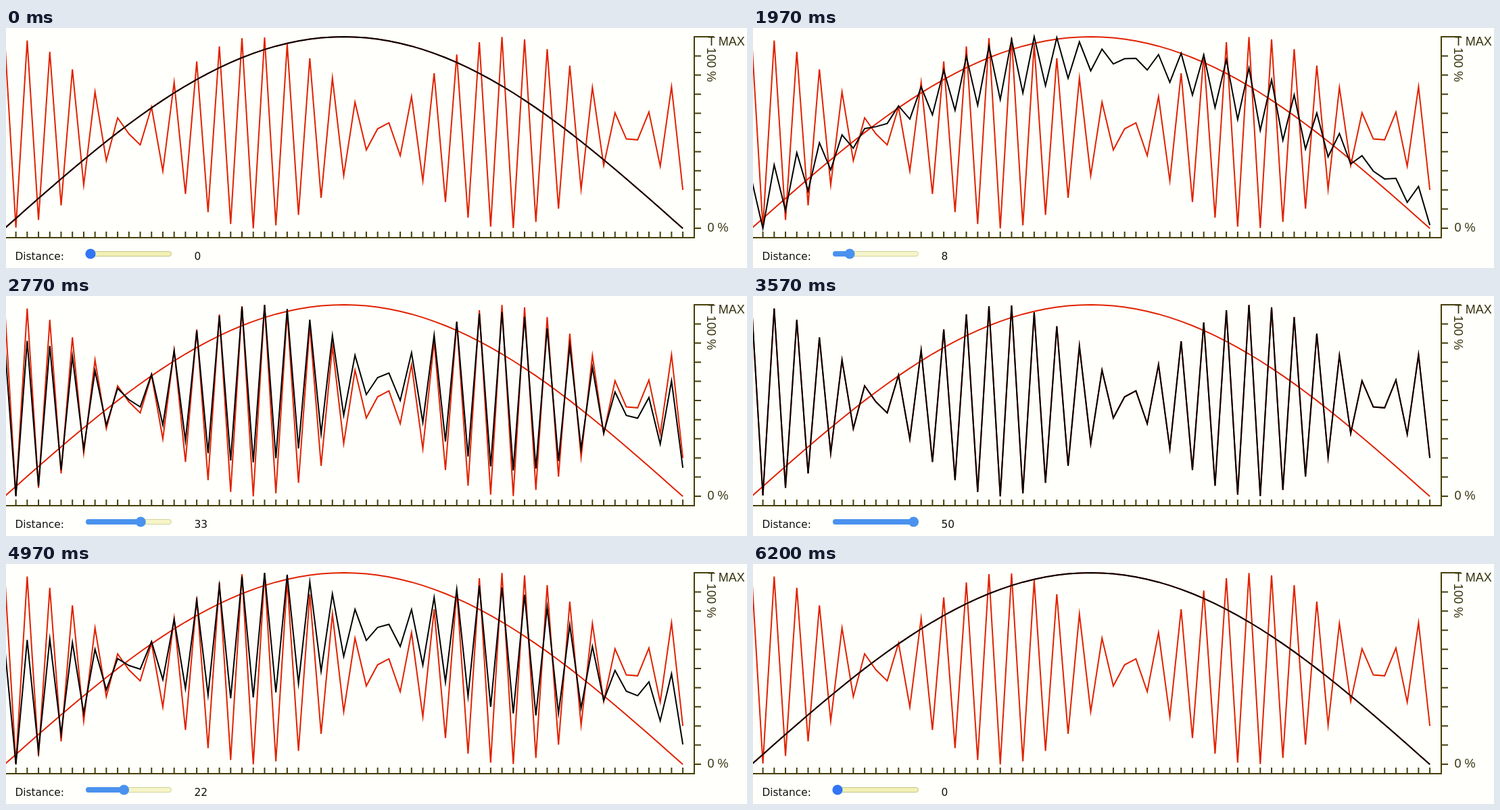
Recreate the animation shown at these times as an HTML page. Size 1096 by 356 pixels, loop 7.87 s.

```html
<!DOCTYPE html>
<html lang="en">
<head>
<meta charset="utf-8">
<title>Wave blend</title>
<style>
  html, body { margin: 0; width: 100%; height: 100%; overflow: hidden; background: #fffffb; }
  svg { display: block; width: 1096px; height: 356px; }
  .axis { fill: none; stroke: #453f08; stroke-width: 2; }
  .wave { fill: none; stroke: #e02200; stroke-width: 2; stroke-miterlimit: 10; }
  .blend { stroke: #000; }
  .scale { font: 18px "Liberation Sans", Arial, sans-serif; fill: #33300c; }
  .label { font: 15.4px "DejaVu Sans", Verdana, sans-serif; fill: #111; }
  #slider { --accent: #3275f5; --track: #f1f0b4; --edge: #c6c58c; }
  #slider.hover { --accent: #2c68d8; --track: #e9e8ae; --edge: #b4b37c; }
  #slider.active { --accent: #4a92ee; --track: #f6f5c8; --edge: #d2d19c; }
  .track { fill: var(--track); stroke: var(--edge); }
  .accent { fill: var(--accent); }
</style>
</head>
<body>
<svg viewBox="0 0 1096 356">
  <path id="axes" class="axis"/>
  <text class="scale" x="1038" y="26">T MAX</text>
  <text class="scale" transform="translate(1036.5 29) rotate(90)">100 %</text>
  <text class="scale" x="1037.5" y="302">0 %</text>
  <polyline id="slow" class="wave"/>
  <polyline id="fast" class="wave"/>
  <polyline id="blend" class="wave blend"/>
  <text class="label" x="13.4" y="344">Distance:</text>
  <g id="slider">
    <rect class="track" x="118.5" y="331.5" width="126" height="7" rx="3.5"/>
    <rect id="fill" class="accent" x="118" y="331" height="8" rx="4"/>
    <circle id="thumb" class="accent" cy="335" r="7.6"/>
  </g>
  <text id="value" class="label" x="278.5" y="344">0</text>
</svg>
<script>
const LOOP = 7870, MAX = 50, COUNT = 60;
const LEFT = -2.1, STEP = 16.72, TOP = 13, BASE = 297.3;
const $ = id => document.getElementById(id);
const xAt = i => LEFT + STEP * i;

// Drag runs: start, end, number of updates, first value, last value
const drags = [
  [1600, 1830, 4, 1, 6],
  [1970, 2700, 16, 8, 31],
  [2770, 3130, 9, 33, 50],
  [4470, 5200, 16, 49, 8],
  [5300, 5430, 5, 6, 0]
];

// Mix of a slow half sine and a fast cosine, normalised to the full height
function wavePoints(distance) {
  const w = distance / MAX;
  const v = Array.from({ length: COUNT + 1 }, (_, i) =>
    (1 - w) * Math.sin(Math.PI * i / COUNT) + w * Math.cos(3 * i));
  const min = Math.min(...v), range = Math.max(...v) - min;
  return v.map((a, i) =>
    xAt(i).toFixed(2) + "," + (BASE - (BASE - TOP) * (a - min) / range).toFixed(2)).join(" ");
}

function distanceAt(t) {
  let d = 0;
  for (const [start, end, n, from, to] of drags) {
    if (t < start) break;
    const k = Math.min(n - 1, Math.floor((t - start) / (end - start) * (n - 1) + 1e-6));
    d = Math.round(from + (to - from) * k / (n - 1));
  }
  return d;
}

function stateAt(t) {
  if (t < 470 || t >= 6170) return "";
  return t >= 1400 && t < 5870 ? "active" : "hover";
}

function drawAxes() {
  let path = "M0 311H1018V13H1047";
  for (let i = 1; i <= COUNT; i++) path += `M${xAt(i).toFixed(2)} 302V311`;
  for (let i = 0; i < 10; i++) path += `M1018 ${(297 - 28.4 * i).toFixed(1)}H1028`;
  $("axes").setAttribute("d", path);
}

let shown = -1;
function render(now) {
  const t = now % LOOP, d = distanceAt(t);
  $("slider").setAttribute("class", stateAt(t));
  if (d !== shown) {
    shown = d;
    const x = 125 + 2.25 * d;
    $("blend").setAttribute("points", wavePoints(d));
    $("fill").setAttribute("width", x - 118);
    $("thumb").setAttribute("cx", x);
    $("value").textContent = d;
  }
}

drawAxes();
$("slow").setAttribute("points", wavePoints(0));
$("fast").setAttribute("points", wavePoints(MAX));
render(0);

const origin = performance.now();
function tick() {
  render(performance.now() - origin);
  requestAnimationFrame(tick);
}
requestAnimationFrame(tick);
</script>
</body>
</html>
```
